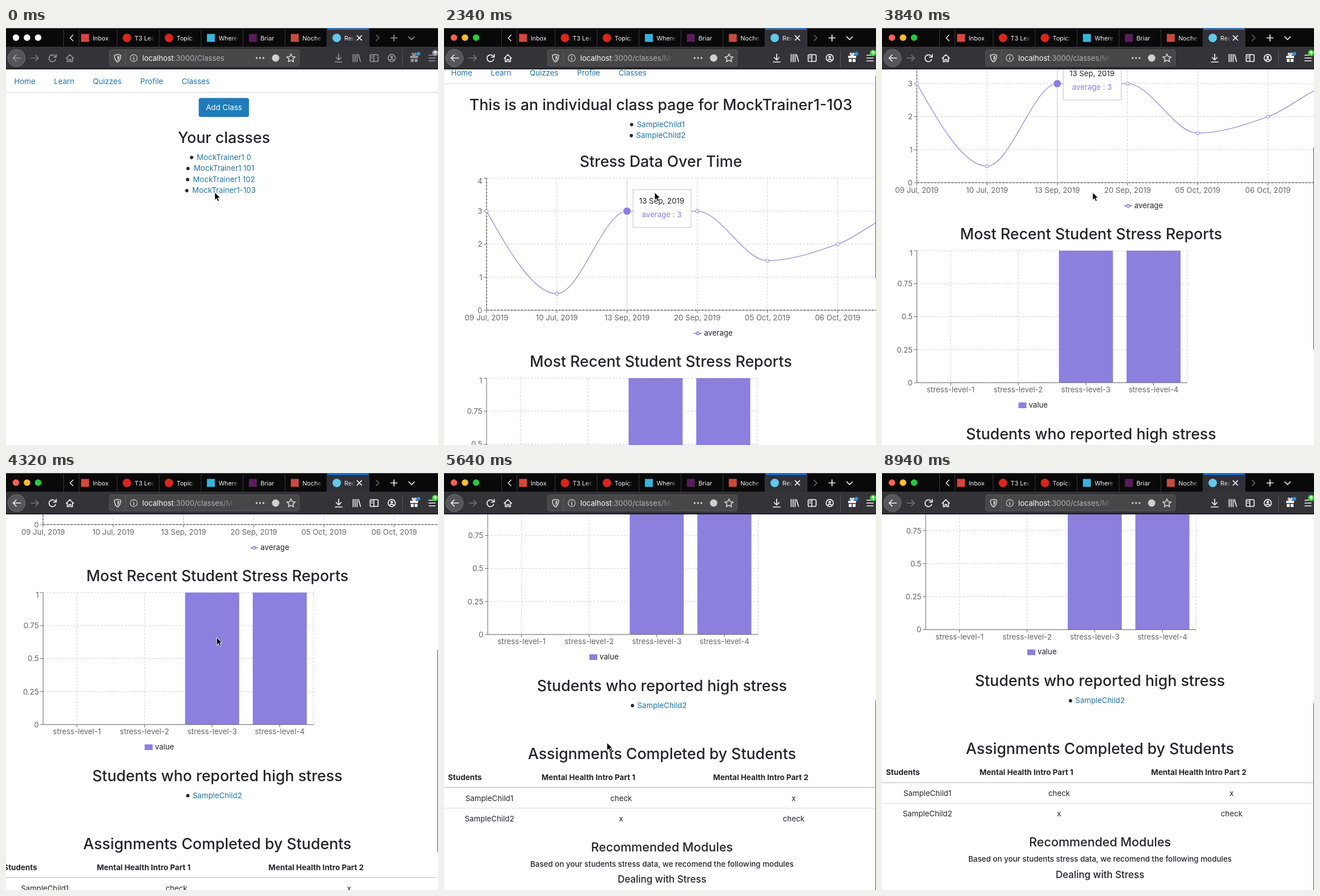
An HTML page that plays this animation: 761x736 px, repeating every 9120 ms.

```html
<!DOCTYPE html>
<html lang="en">
<head>
<meta charset="utf-8">
<title>Class stress dashboard</title>
<style>
html, body { margin: 0; width: 100%; height: 100%; overflow: hidden; background: #fff; }
svg { display: block; font: 13px Inter, "Open Sans", sans-serif; fill: none; }
text { fill: #212529; white-space: pre; }
.mid { text-anchor: middle; }
.end { text-anchor: end; }
.head { font-weight: 500; }
.bold { font-weight: 700; }
.link { fill: #2272a8; }
.white { fill: #fff; }
.purple { fill: #8b80de; }
.axis { fill: #666; }
.tab { fill: #f4f4f6; }
.grid { stroke: #ccc; stroke-dasharray: 3 3; }
.line { stroke: #666; }
.curve { stroke: #8278d4; stroke-width: 1.1; }
.dot { stroke: #8278d4; fill: #fff; }
.icon { stroke: currentColor; stroke-width: 1.7; stroke-linecap: round; stroke-linejoin: round; }
</style>
</head>
<body>
<svg id="stage" width="761" height="736" viewBox="0 0 761 736"></svg>
<script>
const LOOP = 9120, STEP = 60;
const PURPLE = '#8b80de', BAR = '#09090a', TOOL = '#343438', TAB = '#303036', FIELD = '#474749';
const LEFT = 77, GAP = 123.7, TOP1 = 280, BASE1 = 513, TOP2 = 633, BASE2 = 866, RIGHT2 = 553.5;
const averages = [3, .5, 3, 3, 1.5, 2, 3, 3];
const dates = ['09 Jul, 2019', '10 Jul, 2019', '13 Sep, 2019', '20 Sep, 2019', '05 Oct, 2019', '06 Oct, 2019'];
const TEACHER = 'MockTrainer1', STUDENT = 'SampleChild';

// Markup helpers; text is placed by the middle of its capitals.
const text = (x, y, str, cls = '', size = 13.3, extra = '') =>
  `<text x="${x}" y="${y + size * .363}" class="${cls}" style="font-size:${size}px" ${extra}>${str}</text>`;
const title = (y, str, size = 26.75) => text(384, y, str, 'mid head', size);
const path = (d, cls = 'icon', extra = '') => `<path d="${d}" class="${cls}" ${extra}/>`;
const rect = (x, y, w, h, fill, extra = '') =>
  `<rect x="${x}" y="${y}" width="${w}" height="${h}" fill="${fill}" ${extra}/>`;
const circle = (x, y, r, fill, extra = '') => `<circle cx="${x}" cy="${y}" r="${r}" fill="${fill}" ${extra}/>`;
const each = (list, fn) => list.map(fn).join('');
const bullet = (x, y, str, id = '') =>
  circle(x, y + .5, 2.9, '#212529') + text(384, y, str, 'mid link', 13.3, id && `id="${id}"`);

const px = i => LEFT + GAP * i;
const py = v => BASE1 - v * (BASE1 - TOP1) / 4;

// Monotone cubic through equally spaced points.
function monotone(v) {
  const n = v.length - 1;
  const sec = v.slice(1).map((b, i) => b - v[i]);
  const m = v.map((_, i) => {
    if (!i || i === n) return 0;
    const a = sec[i - 1], b = sec[i];
    return (Math.sign(a) + Math.sign(b)) * Math.min(Math.abs(a), Math.abs(b), Math.abs(a + b) / 4);
  });
  m[0] = (3 * sec[0] - m[1]) / 2;
  m[n] = (3 * sec[n - 1] - m[n - 1]) / 2;
  return `M${px(0)} ${py(v[0])}` + each(sec, (_, i) =>
    `C${px(i + 1 / 3)} ${py(v[i] + m[i] / 3)} ${px(i + 2 / 3)} ${py(v[i + 1] - m[i + 1] / 3)} ${px(i + 1)} ${py(v[i + 1])}`);
}

function navBar() {
  const links = [[14.5, 'Home'], [84.5, 'Learn'], [153, 'Quizzes'], [236.5, 'Profile'], [309.5, 'Classes']];
  return each(links, ([x, s]) => text(x, 94, s, 'link')) + path('M0 113.5H760', '', 'stroke="#d4d4d6"');
}

function listPage() {
  return navBar() +
    rect(339.5, 123.5, 88.5, 33.5, '#1f7bbb', 'rx="3.5"') +
    text(384, 140.5, 'Add Class', 'mid white') +
    title(193, 'Your classes') +
    bullet(327, 228, TEACHER + ' 0') +
    bullet(320.5, 247.5, TEACHER + ' 101') +
    bullet(320, 267, TEACHER + ' 102') +
    bullet(318.5, 286.5, TEACHER + '-103', 'target');
}

function lineChart() {
  const end = px(7);
  return each([0, 1, 2, 3, 4], v => path(`M${LEFT} ${py(v)}H${end}`, 'grid') +
      path(`M${LEFT - 5} ${py(v)}h5`, 'line') + text(69.5, v === 4 ? 285 : py(v), v, 'axis end')) +
    each(averages, (_, i) => path(`M${px(i)} ${TOP1}V${BASE1}`, 'grid') + path(`M${px(i)} ${BASE1}v5`, 'line')) +
    path(`M${LEFT} ${TOP1}V${BASE1}H${end}`, '', 'stroke="#999"') +
    path(`M${LEFT} ${TOP1}V${BASE1}H${end}`, '', 'stroke="#444" stroke-dasharray="3 3"') +
    each(dates, (d, i) => text(px(i), 526, d, 'axis mid')) +
    `<g id="hoverLine">${path(`M${px(2)} ${TOP1}V${BASE1}`, '', 'stroke="#ccc"')}</g>` +
    path(monotone(averages), 'curve', 'id="curve" pathLength="1" stroke-dasharray="1 1"') +
    `<g id="dots">${each(averages, (v, i) => circle(px(i), py(v), 2.9, '#fff', 'class="dot"'))}</g>` +
    path('M442 554h14', 'curve', 'style="stroke-width:1.6"') +
    circle(449, 554, 2.4, '#fff', 'class="dot" style="stroke-width:1.5"') + text(460, 553, 'average');
}

function tooltip() {
  return `<g id="activeDot">${circle(px(2), py(3), 7, PURPLE, 'stroke="#fff"')}</g>
    <g id="tip">${rect(.5, .5, 102, 66.5, '#fff', 'stroke="#ccc" stroke-width="1.2"')}
    ${text(51, 20.5, dates[2], 'mid')}${text(51, 44, 'average : 3', 'mid purple')}</g>`;
}

function barChart() {
  const band = (RIGHT2 - LEFT) / 4;
  const mids = [0, 1, 2, 3].map(i => LEFT + band * (i + .5));
  return each([0, .25, .5, .75, 1], v => {
      const y = BASE2 - v * (BASE2 - TOP2);
      return path(`M${LEFT} ${y}H${RIGHT2}`, 'grid') + path(`M${LEFT - 5} ${y}h5`, 'line') +
        text(69.5, v === 1 ? 637.5 : y, v, 'axis end');
    }) +
    each([...mids, RIGHT2], x => path(`M${x} ${TOP2}V${BASE2}`, 'grid')) +
    each(mids, (x, i) => path(`M${x} ${BASE2}v5`, 'line') + text(x, 878.5, 'stress-level-' + (i + 1), 'axis mid')) +
    each(mids.slice(2), x => rect(x - 47.6, TOP2, 95.2, BASE2 - TOP2, PURPLE, 'class="bar"')) +
    path(`M${LEFT} ${TOP2}V${BASE2}H${RIGHT2}`, 'line') +
    rect(256, 901, 14, 10, PURPLE) + text(274, 905, 'value');
}

function table() {
  const cells = [[1155, 1, 'check', 'x'], [1191, 2, 'x', 'check']];
  return text(7, 1118, 'Students', 'bold', 13.5) +
    text(254.3, 1118, 'Mental Health Intro Part 1', 'mid bold', 13.5) +
    text(558, 1118, 'Mental Health Intro Part 2', 'mid bold', 13.5) +
    path('M-2 1136H769', '', 'stroke="#d3d6d9" stroke-width="1.8"') +
    path('M-2 1172.5H769', '', 'stroke="#d9dcdf"') +
    each(cells, ([y, n, a, b]) => text(80, y, STUDENT + n, 'mid') + text(312, y, a, 'mid') + text(616, y, b, 'mid'));
}

function classPage() {
  return navBar() +
    title(150.5, `This is an individual class page for ${TEACHER}-103`) +
    bullet(332.5, 185, STUDENT + 1) + bullet(332, 204.5, STUDENT + 2) +
    title(250.5, 'Stress Data Over Time') + lineChart() +
    title(603.5, 'Most Recent Student Stress Reports') + barChart() +
    title(956, 'Students who reported high stress') + bullet(332, 991, STUDENT + 2) +
    title(1076, 'Assignments Completed by Students') + table() +
    title(1241, 'Recommended Modules', 21.6) +
    title(1271, 'Based on your students stress data, we recomend the following modules', 13.4) +
    title(1298, 'Dealing with Stress', 17) + tooltip();
}

function tabs() {
  const items = [['Inbox', '#d9453d', 0], ['T3 Lec', '#d9261c', 1], ['Topic:', '#d9261c', 1], ['Where', '#36b5dc', 0],
    ['Briar', '#5a1d5c', 0], ['Noche', '#c94a3f', 0], ['Rea', '#61c9ea', 1]];
  return each(items, ([name, color, round], i) => {
    const x = 122.2 + 73.9 * i, active = i === 6;
    return (active ? rect(566, 1, 73, 32, TAB) + rect(566, 1, 73, 2, '#0a84ff') : '') +
      (round ? circle(x + 17, 17.5, 7.5, color) : rect(x + 10, 10.5, 14, 14, color)) +
      text(x + 30.5, 18, name, 'tab', 10.8) +
      (i ? rect(x + (active ? 39 : 54), 8, active ? 13 : 16, 20, active ? 'url(#fadeTab)' : 'url(#fadeBar)') : '') +
      path(`M${i ? x - .2 : 128.5} 2V33`, '', 'stroke="#3a3a3e"');
  }) + path('M101.5 2V33M639.5 2V33', '', 'stroke="#3a3a3e"') +
    path('M618.5 13.5l8 8M626.5 13.5l-8 8', 'icon', 'style="color:#fff"') +
    path('M118 12.5l-5 5 5 5', 'icon', 'style="color:#ddd"') + path('M652 12.5l5 5-5 5', 'icon', 'style="color:#66666a"');
}

function toolIcons() {
  return path('M678 17.5h11M683.5 12v11M709.5 15.5l5 5 5-5') +
    path('M25.5 53h-13M18 47.5l-5.5 5.5 5.5 5.5') +
    path('M87.5 55.5a6 6 0 1 1-1.5-6.5l2 2M88.5 46.5v5h-5') +
    path('M106 53.5l6.5-6.5 6.5 6.5M108 53v6.5h3v-4h3v4h3V53') +
    path('M586 46v10M581.5 52l4.5 4.5 4.5-4.5M580 60h12') +
    path('M611.5 46.5v13M615 46.5v13M618.5 46.5v13M621 47l3.5 12') +
    rect(641.5, 47, 14, 12, 'none', 'rx="2" class="icon"') + path('M648 47v12M644 50h1.5M644 53h1.5') +
    circle(679.5, 53, 6.3, 'none', 'class="icon"') + circle(679.5, 51.3, 2.3, 'currentColor') +
    path('M675.5 57q4-4 8 0') +
    rect(712, 49, 14, 4, 'currentColor') +
    each([713, 719.8], x => rect(x, 54.5, 5.2, 5.5, 'currentColor')) +
    path('M719 48.5q-5-1-3-4 2-1 3 4 1-5 3-4 2 3-3 4') +
    path('M745 48h11M745 53h11M745 58h11');
}

function addressBar() {
  return rect(182.5, 38.5, 334, 28.5, FIELD, 'rx="3" stroke="#5a5a5e"') +
    '<g style="color:#d0d0d4">' +
    path('M196.5 46.5l5.5 1.5c0 6-1 9.5-5.5 12-4.5-2.5-5.5-6-5.5-12z') +
    path('M196.5 49v8.5c2-1.5 3-4 3-7.5z', '', 'fill="currentColor"') +
    path('M210.5 40V66', '', 'stroke="#5e5e62"') +
    circle(225, 53, 6.2, 'none', 'class="icon" style="stroke-width:1.2"') + path('M225 52.5v3.5M225 50v.1') +
    each([441.5, 447.5, 453.5], x => circle(x, 53, 1.7, 'currentColor')) +
    circle(475, 53, 6.5, 'currentColor') +
    path('M502 45.8l2.2 4.7 5 .6-3.7 3.5 1 5-4.5-2.5-4.5 2.5 1-5-3.7-3.5 5-.6z') + '</g>' +
    '<text x="240" y="57.7" style="fill:#b1b1b3"><tspan class="white" fill="#fff">localhost</tspan>:3000<tspan id="route"></tspan></text>' +
    rect(378, 42, 34, 22, 'url(#fadeField)', 'id="urlFade"');
}

function chrome() {
  const fade = (id, c) => `<linearGradient id="${id}"><stop stop-color="${c}" stop-opacity="0"/><stop offset=".75" stop-color="${c}"/></linearGradient>`;
  return `<defs>${fade('fadeBar', BAR)}${fade('fadeTab', TAB)}${fade('fadeField', FIELD)}</defs>` +
    rect(0, 0, 761, 34, BAR) + rect(0, 0, 761, 1, '#55555a') +
    rect(0, 33, 761, 39, TOOL) + rect(0, 71.5, 761, 1.5, '#111114') + tabs() +
    each([17.5, 37, 56.5], x => circle(x, 17, 5.8, '#fff', 'class="light"')) +
    circle(18.5, 53, 15.3, '#55555a', 'stroke="#707075"') +
    path('M57 53H44M52 48l5 5-5 5', 'icon', 'style="color:#77777b"') +
    `<g id="tools">${toolIcons()}</g>` +
    path('M698.5 38V68', '', 'stroke="#55555a"') +
    circle(726.5, 45.5, 3.2, '#2196f3') + circle(756, 44, 5.6, '#30d92b', 'id="badge"') +
    path('M756 47v-6M753.5 43.5l2.5-2.5 2.5 2.5', 'icon', 'style="color:#fff;stroke-width:1.4"') +
    addressBar();
}

const ARROW = 'M0 0V13.8L3.2 10.9 5.5 16 7.9 15 5.7 9.9H10Z';
const HAND = 'M3 8V1.5a1.5 1.5 0 0 1 3 0V6l6 1.5q1.5.5 1.3 2.5l-1 5.5H5L1 11q-1-2 .5-2.2z';

const stage = document.getElementById('stage');
stage.innerHTML = rect(0, 0, 761, 736, '#fff') +
  `<g id="list">${listPage()}</g><g id="detail">${classPage()}</g>` +
  rect(760, 0, 1, 357, '#55555a', 'id="thumb"') + `<g id="chrome">${chrome()}</g>` +
  `<g id="cursor" stroke="#fff">${path(ARROW, '', 'id="arrow" fill="#000"')}${path(HAND, '', 'id="hand" fill="#000"')}</g>`;

const $ = id => document.getElementById(id);
const bars = [...stage.querySelectorAll('.bar')];
const lights = [...stage.querySelectorAll('.light')];

// time, scroll down, shift sideways
const scrollKeys = [[2040, 0, 0], [2640, 30, -4], [2820, 30, -4], [3000, 66, -6.8], [3240, 110, -9], [3600, 110, -9],
  [3840, 240, -15.6], [4320, 422, -11.7], [4560, 500, 0], [5280, 500, 0], [5640, 581, 0], [5760, 589.5, 0]];
// time, x, y
const cursorKeys = [[1440, 367.7, 290], [1500, 371, 290], [4560, 371, 290], [4980, 287, 476], [7920, 287, 476],
  [8520, 268, 700], [8640, 268, 700], [8940, 266, 742]];

function sample(keys, t) {
  const i = keys.findIndex(k => k[0] > t);
  if (i === 0) return keys[0].slice(1);
  if (i < 0) return keys[keys.length - 1].slice(1);
  const a = keys[i - 1], b = keys[i], f = (t - a[0]) / (b[0] - a[0]);
  return a.slice(1).map((v, j) => v + (b[j + 1] - v) * f);
}

// CSS "ease" curve
function ease(p) {
  if (p <= 0) return 0;
  if (p >= 1) return 1;
  const bez = (u, a, b) => 3 * u * (1 - u) * (1 - u) * a + 3 * u * u * (1 - u) * b + u * u * u;
  let lo = 0, hi = 1;
  for (let i = 0; i < 24; i++) {
    const u = (lo + hi) / 2;
    if (bez(u, .25, .25) < p) lo = u; else hi = u;
  }
  return bez(lo, .1, 1);
}

const show = (id, on) => $(id).setAttribute('display', on ? 'inline' : 'none');
const move = (id, x, y) => $(id).setAttribute('transform', `translate(${x} ${y})`);

function draw(t) {
  const focused = t >= 120, opened = t >= 540, over = focused && !opened;
  show('list', !opened);
  show('detail', opened);

  $('tools').style.color = focused ? '#f4f4f6' : '#98989c';
  $('badge').setAttribute('fill', focused ? '#30d92b' : '#88888c');
  lights.forEach((l, i) => l.setAttribute('fill', focused ? ['#ff5f57', '#febc2e', '#28c840'][i] : '#fff'));
  $('route').textContent = opened ? '/classes/Mo' : '/Classes';
  show('urlFade', opened);
  $('target').style.textDecoration = over ? 'underline' : 'none';
  $('target').style.fill = over ? '#15517a' : '';

  const [down, side] = sample(scrollKeys, t);
  move('detail', side, -down);
  show('thumb', t >= 2100);
  $('thumb').setAttribute('y', 76 + .56 * down);

  $('curve').setAttribute('stroke-dashoffset', 1 - ease((t - 510) / 1500));
  show('dots', t >= 2100);
  const grow = ease((t - 540) / 400) * (BASE2 - TOP2);
  bars.forEach(b => {
    b.setAttribute('y', BASE2 - grow);
    b.setAttribute('height', grow);
  });

  const hovering = t >= 1500 && t < 4400;
  ['hoverLine', 'activeDot', 'tip'].forEach(id => show(id, hovering));
  const slide = ease((t - 1430) / 400);
  move('tip', LEFT + 257.5 * slide, TOP1 + 20 * slide);

  const [cx, cy] = sample(cursorKeys, t);
  move('cursor', cx, cy);
  show('arrow', !over);
  show('hand', over);
}

const start = performance.now();
function tick() {
  const t = (performance.now() - start) % LOOP;
  draw(Math.floor(t / STEP) * STEP);
  requestAnimationFrame(tick);
}
draw(0);
requestAnimationFrame(tick);
</script>
</body>
</html>
```
